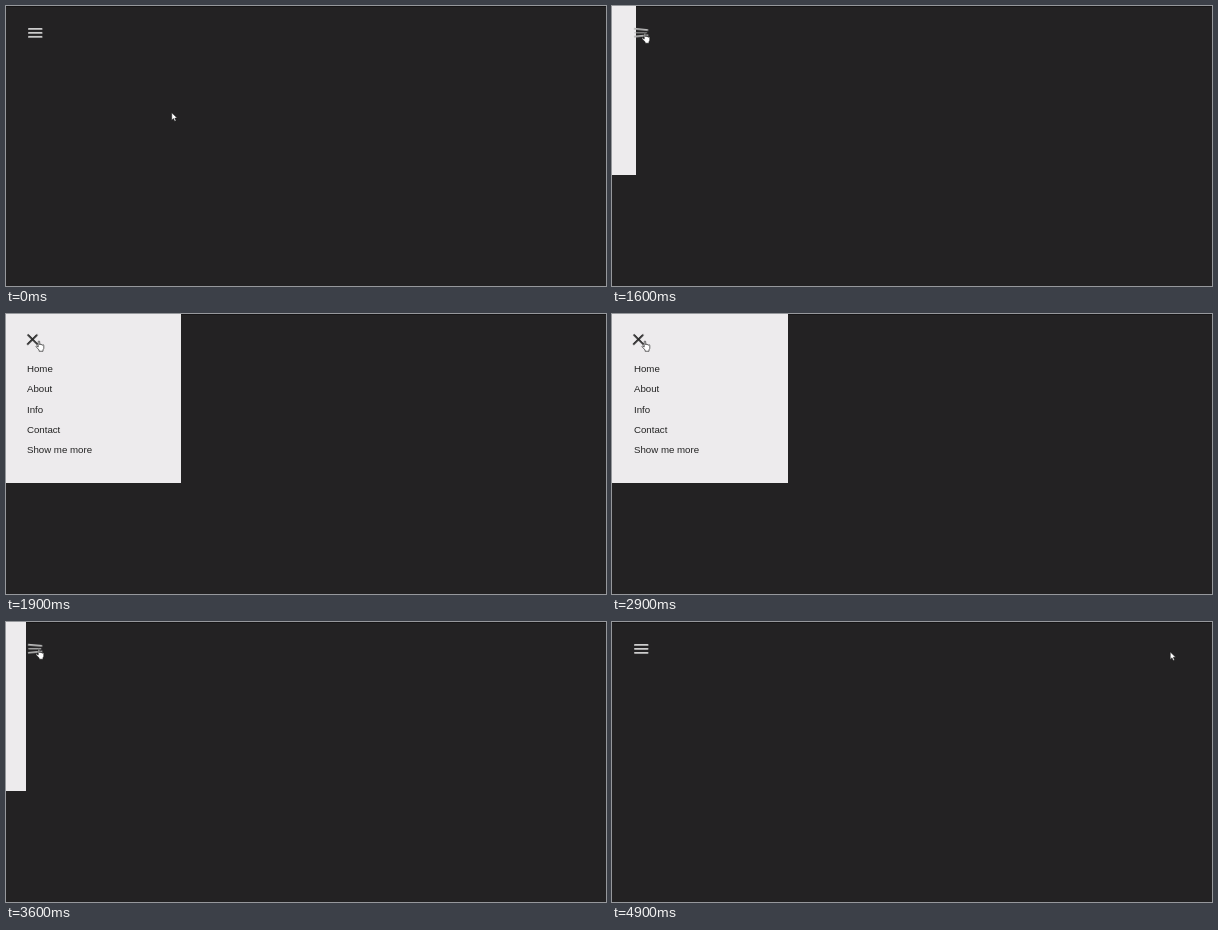
These frames come from a looping animation (600x280 px, 5.1 s). An HTML page:

```html
<!DOCTYPE html>
<html lang="en">
<head>
<meta charset="utf-8">
<title>Fold-out menu</title>
<style>
  html, body {
    margin: 0;
    width: 100%;
    height: 100%;
    overflow: hidden;
    background: #232223;
  }
  .stage {
    --opening: 1;
    --closing: 1;
    --ease: cubic-bezier(.77, .2, .05, 1);
    position: relative;
    width: 600px;
    height: 280px;
    overflow: hidden;
    background: #232223;
    box-shadow: inset 0 1px #161516;
  }
  .scene {
    position: absolute;
    left: 0;
    top: 0;
    transform: scale(.44);
    transform-origin: 0 0;
  }
  .menu, .bar {
    position: absolute;
    animation-duration: .5s;
    animation-timing-function: var(--ease);
    animation-delay: calc(var(--opening) * 1ms), calc(var(--closing) * 1ms);
    animation-fill-mode: forwards;
    animation-play-state: paused;
  }
  .menu {
    left: 0;
    top: -23px;
    width: 300px;
    margin: 0;
    padding: 125px 50px 50px;
    list-style: none;
    background: #edebed;
    color: #232323;
    font: 22px/26px "Liberation Sans", Arial, sans-serif;
    transform: translateX(-100%);
    animation-name: slide-in, slide-out;
  }
  .menu li { padding: 10px 0; white-space: nowrap; }

  .bar {
    left: 50px;
    width: 33px;
    height: 4px;
    border-radius: 3px;
    background: #cdcdcd;
    transform-origin: 4px 0;
    animation-name: fold, unfold;
  }
  .top { top: 50px; --folded: rotate(45deg) translate(-2px, -1px); }
  .mid {
    top: 59px;
    --folded: rotate(0deg) scale(.2);
    animation-name: fold, unfold, fade-out, fade-in;
    animation-duration: .5s, .5s, .55s, .55s;
    animation-timing-function: var(--ease), var(--ease), ease, ease;
  }
  .low { top: 68px; --folded: rotate(-45deg) translate(0, -1px); transform-origin: 0 100%; }

  @keyframes slide-in { from { transform: translateX(-100%); } to { transform: translateX(0); } }
  @keyframes slide-out { from { transform: translateX(0); } to { transform: translateX(-100%); } }
  @keyframes fold {
    from { transform: none; background: #cdcdcd; }
    to { transform: var(--folded); background: #232323; }
  }
  @keyframes unfold {
    from { transform: var(--folded); background: #232323; }
    to { transform: none; background: #cdcdcd; }
  }
  @keyframes fade-out { from { opacity: 1; } to { opacity: 0; } }
  @keyframes fade-in { from { opacity: 0; } to { opacity: 1; } }

  .cursor { position: absolute; left: 0; top: 0; overflow: visible; }
  .cursor path { fill: #fff; stroke: #1a1a1a; stroke-linejoin: round; }
</style>
</head>
<body>
<div class="stage">
  <div class="scene">
    <ul class="menu">
      <li>Home</li>
      <li>About</li>
      <li>Info</li>
      <li>Contact</li>
      <li>Show me more</li>
    </ul>
    <div class="bar top"></div>
    <div class="bar mid"></div>
    <div class="bar low"></div>
  </div>
  <svg class="cursor" id="arrow" width="6" height="9" viewBox="0 0 12 18">
    <path d="M.5 .5V15.5L4 12.2L6.4 17.6L9 16.5L6.6 11.2H11.4Z"/>
  </svg>
  <svg class="cursor" id="hand" width="8.5" height="11" viewBox="0 0 17 22">
    <path stroke-width="1.3" d="M5.2 13V2.4a1.5 1.5 0 0 1 3 0V8.4a1.4 1.4 0 0 1 2.8 .4a1.4 1.4 0 0 1 2.7 .6a1.4 1.4 0 0 1 2.7 1V15.5L14.8 18.5V21.3H7V18.8L1.2 12.6c-.9-1.7 1-2.8 2.1-1.5Z"/>
  </svg>
</div>
<script>
  const LOOP = 5100, STEP = 100;
  const OPEN_AT = 1466, CLOSE_AT = 3316;
  const HOVER = [1000, 4000];

  // time, x, y of the pointer tip
  const path = [
    [0, 165.5, 106.5], [100, 76, 84], [200, 34, 70.5], [300, 34, 70.5],
    [500, 33, 52], [700, 30.5, 33], [900, 30.5, 33],
    [1000, 32.5, 27.5], [1100, 32.5, 26.6], [3900, 32.5, 26.6],
    [4000, 182, 8.7], [4100, 300, 42], [4200, 372, 65.5], [4300, 372, 65.5],
    [4400, 485, 56], [4500, 563, 42.5], [4600, 563, 42.5],
    [4900, 558, 29.7], [LOOP, 558, 29.7]
  ];

  const stage = document.querySelector(".stage");
  const arrow = document.getElementById("arrow");
  const hand = document.getElementById("hand");

  function pointAt(t) {
    const i = path.findIndex(p => p[0] > t);
    const [t0, x0, y0] = path[i - 1];
    const [t1, x1, y1] = path[i];
    const k = (t - t0) / (t1 - t0);
    return [x0 + (x1 - x0) * k, y0 + (y1 - y0) * k];
  }

  function draw(t) {
    // the press registers one step before the panel shows
    stage.style.setProperty("--opening", t < OPEN_AT + STEP ? 1 : OPEN_AT - t);
    stage.style.setProperty("--closing", t < CLOSE_AT ? 1 : CLOSE_AT - t);

    const [x, y] = pointAt(t);
    const hover = t >= HOVER[0] && t < HOVER[1];
    arrow.style.display = hover ? "none" : "block";
    hand.style.display = hover ? "block" : "none";
    arrow.style.transform = `translate(${x}px, ${y}px)`;
    hand.style.transform = `translate(${x - 2.9}px, ${y}px)`;
  }

  const start = performance.now();
  function tick() {
    const t = (performance.now() - start) % LOOP;
    draw(Math.floor(t / STEP) * STEP);
    requestAnimationFrame(tick);
  }
  tick();
</script>
</body>
</html>
```
